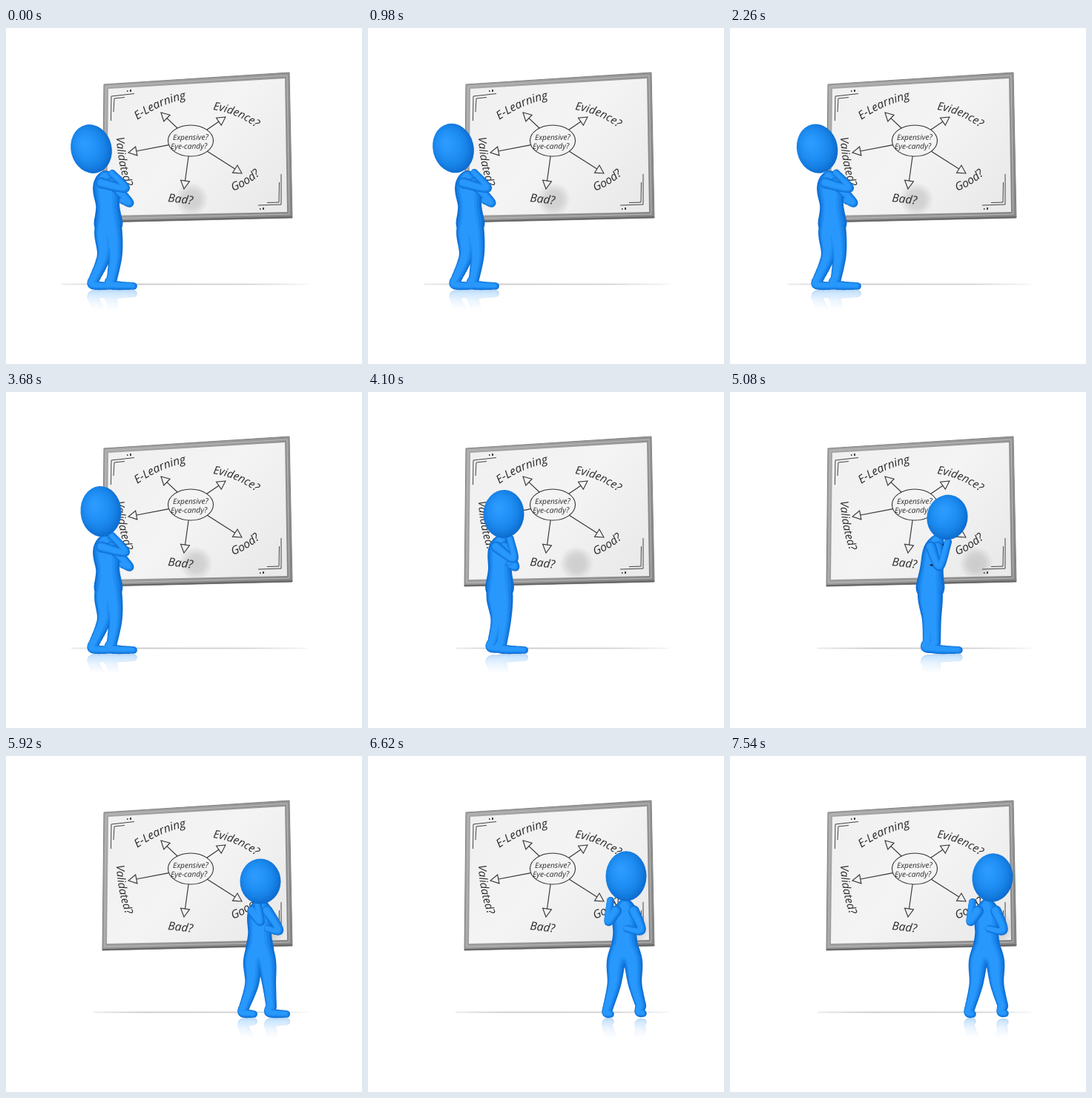
Animation, 480 px wide and 453 px high, one loop 8000 ms. Source, as an HTML page with a canvas:

```html
<!DOCTYPE html>
<html lang="en">
<head>
<meta charset="utf-8">
<title>Thinking at the whiteboard</title>
<style>
html, body { margin: 0; width: 100%; height: 100%; overflow: hidden; background: #fff; }
canvas { display: block; }
</style>
</head>
<body>
<canvas id="stage" width="480" height="453"></canvas>
<script>
const ctx = document.getElementById('stage').getContext('2d');
const { PI, sin, cos, min, max, floor, ceil, hypot, atan2 } = Math;
const LOOP = 8000, STEP = 140, FLOOR = 353, HOME = 138;
const BLUES = ['#0f70d4', '#1882e8', '#208ff6', '#2898fd'];
const DARK = '#16233c';

// Bursts of movement: start time, number of steps. The picture rests in between.
const BURSTS = [[0, 10], [2260, 4], [3680, 22], [7120, 4]];

// yaw 0 shows the back, PI/2 faces right; turn is the head's offset from the neck.
const KEYS = [
  { step: 9, x: HOME, yaw: 1, lean: -4, turn: -19, headY: 163 },
  { step: 14, x: HOME, yaw: 1, lean: -4, turn: -6, headY: 161 },
  { step: 20, x: 217, yaw: 1.2, lean: 8, turn: 13, headY: 168 },
  { step: 24, x: 270, yaw: 1.2, lean: 9, turn: 14, headY: 169 },
  { step: 30, x: 342, yaw: .6, lean: 1, turn: 0, headY: 169 },
  { step: 35, x: 346, yaw: 0, lean: 1, turn: 1, headY: 162 },
  { step: 39, x: 346, yaw: 0, lean: 1, turn: 7, headY: 164 }
];

function stepAt(t) {
  return BURSTS.reduce((n, [start, count]) =>
    n + max(0, min(count, floor((t - start) / STEP) + 1)), -1);
}

function poseAt(step) {
  const i = max(1, KEYS.findIndex(k => k.step >= step));
  const a = KEYS[i - 1], b = KEYS[i], pose = {};
  const u = max(0, (step - a.step) / (b.step - a.step));
  for (const name in a) pose[name] = a[name] + (b[name] - a[name]) * u;
  if (step < 9) pose.headY -= 1.5 * sin(PI * step / 9);
  return pose;
}

function poly(points, close) {
  ctx.beginPath();
  for (const p of points) ctx.lineTo(...p);
  if (close) ctx.closePath();
}

function line(...points) {
  poly(points);
  ctx.stroke();
}

function ellipse(x, y, rx, ry, angle = 0) {
  ctx.beginPath();
  ctx.ellipse(x, y, rx, ry, angle, 0, 2 * PI);
}

function fade(gradient, ...colors) {
  colors.forEach((c, i) => gradient.addColorStop(i / (colors.length - 1), c));
  return gradient;
}

// Letters at their natural advance, turning steadily from angle a0 to a1.
function arcText(text, x, y, size, a0, a1) {
  ctx.font = `italic ${size}px "Open Sans", sans-serif`;
  const total = ctx.measureText(text).width;
  let done = 0;
  for (const ch of text) {
    const w = ctx.measureText(ch).width;
    const a = a0 + (a1 - a0) * (done + w / 2) / total;
    ctx.save();
    ctx.translate(x, y);
    ctx.rotate(a);
    ctx.fillText(ch, 0, 0);
    ctx.restore();
    x += w * cos(a);
    y += w * sin(a);
    done += w;
  }
}

// Ray from the middle bubble, ending in an open triangle.
function arrow(tipX, tipY) {
  const dx = tipX - 249, dy = tipY - 152, a = atan2(dy, dx);
  const edge = 1 / hypot(dx / 30.5, dy / 21);
  const at = (back, side) => [
    tipX - back * cos(a) - side * sin(a), tipY - back * sin(a) + side * cos(a)];
  line([249 + dx * edge, 152 + dy * edge], at(11, 0));
  poly([at(0, 0), at(11, -6), at(11, 6)], true);
  ctx.stroke();
}

function drawBoard(shadowX) {
  poly([[132, 76], [382, 60], [386, 256], [130, 262]], true);
  ctx.fillStyle = fade(ctx.createLinearGradient(130, 70, 386, 250), '#a8a8a8', '#999', '#868686');
  ctx.fill();
  ctx.lineWidth = 1;
  ctx.strokeStyle = '#808080';
  ctx.stroke();
  ctx.strokeStyle = '#bdbdbd';
  poly([[135, 79], [379, 64], [382, 251], [133, 257]], true);
  ctx.stroke();
  ctx.lineWidth = 2;
  ctx.strokeStyle = '#666';
  line([130, 261], [386, 255]);

  poly([[138, 82], [376, 68], [379, 248], [136, 253]], true);
  ctx.fillStyle = fade(ctx.createLinearGradient(150, 80, 340, 250), '#f0f0f0', '#f4f4f4', '#eaeaea');
  ctx.fill();
  ctx.save();
  ctx.clip();
  ctx.fillStyle = fade(ctx.createRadialGradient(shadowX, 231, 0, shadowX, 231, 23),
    'rgba(90,90,90,.22)', 'rgba(90,90,90,.19)', 'rgba(90,90,90,0)');
  ctx.fillRect(shadowX - 25, 205, 50, 50);
  ctx.restore();

  // Corner marks
  ctx.lineWidth = 1;
  ctx.strokeStyle = ctx.fillStyle = '#444';
  line([173, 88.5], [142, 92], [141.5, 125]);
  line([160, 93.5], [146, 95], [145, 113]);
  line([340, 239], [371, 238], [371, 197]);
  line([352, 235.5], [368, 235], [368.5, 208]);
  for (const [x, y] of [[163, 84], [342, 243]]) {
    ctx.fillRect(x, y, 1.5, 2);
    ctx.fillRect(x + 4, y - 1, 2, 3);
  }

  ctx.strokeStyle = '#333';
  ctx.lineWidth = 1.1;
  ellipse(249, 152, 30.5, 21);
  ctx.stroke();
  arrow(209, 114);
  arrow(296, 120);
  arrow(165, 168);
  arrow(240, 217);
  arrow(318, 196);

  ctx.fillStyle = '#2b2b2b';
  arcText('E-Learning', 177, 124, 15.5, -.62, -.2);
  arcText('Evidence?', 279, 110, 15, .14, .65);
  arcText('Validated?', 149, 147, 15, 1.55, 1.22);
  arcText('Bad?', 218, 234, 15.5, .1, .13);
  arcText('Good?', 306, 220, 15.5, -.35, -.75);
  arcText('Expensive?', 225, 151, 10.2, 0, -.02);
  arcText('Eye-candy?', 222, 163, 10.2, 0, -.02);
}

// Smooth curve through points of any dimension (Catmull-Rom).
function spline(pts) {
  const out = [], at = i => pts[min(max(i, 0), pts.length - 1)];
  for (let i = 0; i < pts.length - 1; i++) {
    const [p, a, b, q] = [at(i - 1), at(i), at(i + 1), at(i + 2)];
    const n = ceil(hypot(b[0] - a[0], b[1] - a[1]) / 1.5) + 1;
    for (let j = 0; j <= n; j++) {
      const u = j / n;
      out.push(a.map((v, k) => v + .5 * u * (b[k] - p[k]
        + u * (2 * p[k] - 5 * v + 4 * b[k] - q[k] + u * (3 * (v - b[k]) + q[k] - p[k])))));
    }
  }
  return out;
}

// Tubes through [x, y, radius] points, shaded as one body in shrinking layers.
function tubes(...paths) {
  const discs = paths.flatMap(spline);
  BLUES.forEach((color, k) => {
    ctx.fillStyle = color;
    ctx.beginPath();
    for (const [x, y, r] of discs) {
      const cx = x - k * .6, cy = y - k * .3, cr = r * (1 - k * .17);
      ctx.moveTo(cx + cr, cy);
      ctx.arc(cx, cy, cr, 0, 2 * PI);
    }
    ctx.fill();
  });
}

function drawFigure({ x, yaw, lean, turn, headY }) {
  const c = cos(yaw), s = sin(yaw);
  const at = (side, forward) => x + side * c + forward * s;
  const stride = 9 * sin(2 * PI * (x - HOME) / 68);

  const legs = [-1, 1].flatMap(side => {
    const step = side * stride, forward = lean * .8 - 5 + step;
    const ankle = at(side * 22, forward), y = 338 - max(0, step) * .3;
    const toe = 3 + 31 * sin(side < 0 ? yaw - .5 * s : yaw);
    return [
      [[x, 250, 15], [at(side * 11, 0), 276, 13], [at(side * 14, 2 + step * .5), 307, 9.5], [ankle, y, 7.2]],
      [[ankle, y, 7.2], [ankle - 2, y + 8, 6.5], [ankle + toe, y + 10, 4.8]]
    ];
  });
  const chest = x + lean * .6;
  const torso = [[x + lean, 201, 9], [chest, 215, 17.5 - lean * .25], [x + lean * .2, 240, 16], [x, 263, 19.5]];
  tubes(...legs, torso);

  const shoulder = side => [chest + side * 12 * c, 209, 7.5];
  const chin = [at(-20, 24) + lean, headY + 33, 5];
  const fold = [at(4, 16) - lean, 233, 5];
  ctx.fillStyle = DARK;
  ctx.globalAlpha = max(0, lean - 1) / 8;
  ellipse(chin[0] - 5, chin[1] + 7, 4, 6, .3);
  ctx.fill();
  ctx.globalAlpha = 1;
  tubes([shoulder(1), [at(24, 14) - lean, 235, 5.5], fold]);
  ctx.globalAlpha = max(0, lean - 1) / 8;
  ctx.fillStyle = DARK;
  ellipse(fold[0] - 2, fold[1], 6, 1.5, -.1);
  ctx.fill();
  ctx.globalAlpha = 1;
  // Leaning forward pulls the raised elbow in and down.
  tubes([shoulder(-1), [at(-22, 36 - 1.5 * lean), 222 + 1.5 * lean, 5.5], chin]);

  ctx.save();
  ctx.translate(x + lean + turn, headY);
  ctx.rotate(turn * .013);
  ctx.scale(27.5, 30.5 + (169 - headY) * .45);
  ctx.fillStyle = fade(ctx.createRadialGradient(-.3, -.3, 0, -.08, -.08, 1.1),
    '#2f9cfd', '#2897fc', '#208ff5', '#1782e6', '#0c6ace');
  ellipse(0, 0, 1, 1);
  ctx.fill();
  ctx.restore();
}

function draw(t) {
  const pose = poseAt(stepAt(t % LOOP));
  const headX = pose.x + pose.lean + pose.turn;
  ctx.fillStyle = '#fff';
  ctx.fillRect(0, 0, 480, 453);
  drawBoard(250 + (headX - 115) * .46);

  // Mirror image on the floor
  ctx.save();
  ctx.beginPath();
  ctx.rect(0, FLOOR, 480, 100);
  ctx.clip();
  ctx.translate(0, 2 * FLOOR);
  ctx.scale(1, -1);
  drawFigure(pose);
  ctx.restore();
  ctx.fillStyle = fade(ctx.createLinearGradient(0, FLOOR, 0, 380),
    'rgba(255,255,255,.7)', 'rgba(255,255,255,.9)', '#fff');
  ctx.fillRect(0, FLOOR, 480, 100);

  const left = min(118, headX - 40);
  ctx.fillStyle = fade(ctx.createLinearGradient(left, 0, 406, 0),
    'rgba(190,190,190,.3)', '#c8c8c8', '#cdcdcd', '#d2d2d2', 'rgba(210,210,210,.2)');
  ctx.fillRect(left, 344.6, 406 - left, 1.8);
  drawFigure(pose);
}

function frame() {
  draw(performance.now());
  requestAnimationFrame(frame);
}
frame();
</script>
</body>
</html>
```
